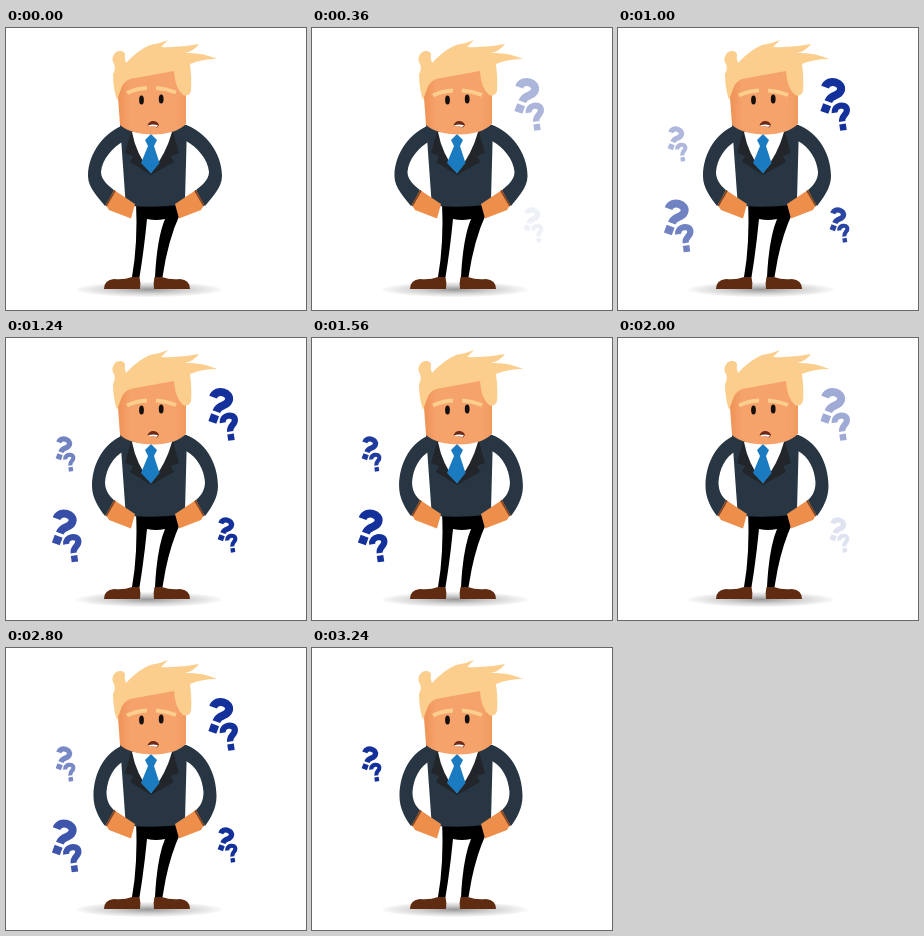
Recreate the animation shown at these times as an HTML page. Size 300 by 282 pixels, loop 3400 ms.

```html
<!DOCTYPE html>
<html lang="en">
<head>
<meta charset="utf-8">
<title>Puzzled businessman</title>
<style>
html, body { margin: 0; width: 100%; height: 100%; overflow: hidden; background: #fff; }
svg { display: block; width: 100vw; height: 100vh; }
</style>
</head>
<body>
<svg viewBox="0 0 300 282">
  <defs>
    <radialGradient id="shade">
      <stop offset="0" stop-color="#999"/>
      <stop offset=".5" stop-color="#d0d0d0"/>
      <stop offset="1" stop-color="#fafafa"/>
    </radialGradient>
    <linearGradient id="skin">
      <stop offset="0" stop-color="#ee8f52"/>
      <stop offset=".2" stop-color="#f5a26b"/>
      <stop offset=".85" stop-color="#f5a26b"/>
      <stop offset="1" stop-color="#f09a5e"/>
    </linearGradient>
    <g id="mark">
      <path d="M-8 -6C-8 -16 8 -16.5 8 -8C8 -1 0 -2 0 6.5" fill="none" stroke="#14309a" stroke-width="8"/>
      <rect x="-4.2" y="9.8" width="8.4" height="8.2" fill="#14309a"/>
    </g>
    <g id="pair">
      <use href="#mark" transform="rotate(20)"/>
      <use href="#mark" transform="translate(11 21) rotate(-8) scale(.78)"/>
    </g>
    <g id="limb">
      <path class="sleeve" fill="#283643"/>
      <path d="M108 162L129 176L125 190.5L103 182L100 177Z" fill="#ee8e4b"/>
      <path d="M109 162.5L100 178" stroke="#7d4526" stroke-width="1.6"/>
    </g>
  </defs>

  <ellipse cx="143" cy="261.5" rx="73" ry="7.5" fill="url(#shade)"/>
  <g fill="#602c11">
    <path id="shoe" d="M126 249H133.500Q135 255 134 261H98Q98 252 108 251Q118 252 126 249Z"/>
    <use href="#shoe" transform="translate(282) scale(-1 1)"/>
  </g>
  <path d="M130 174H174V186Q162 212 156.500 249H149Q151 210 159 191Q150 193 141 191Q138 222 133.500 249H126Q132 215 130 174Z" fill="#000"/>

  <path d="M114 96L181 97L179 172Q179 176 174 177Q148 180 125 178Q120 178 119.500 173Z" fill="#283643"/>
  <use href="#limb"/>
  <use href="#limb" transform="translate(298) scale(-1 1)"/>

  <path d="M125 104L119 125L127 128L124 134L145 147L168 134L165 128L173 125L167 104Z" fill="#22262b"/>
  <path d="M126 104H166Q160 126 145 145Q130 126 126 104Z" fill="#fff"/>
  <path d="M139 112L145 106L151 112L148 118L153.500 135L145 145.500L135 135L142 118Z" fill="#1b7bc1"/>

  <path d="M110 42H180V96Q170 106 147 106.500Q124 106 114 97Z" fill="url(#skin)"/>
  <path d="M111 72Q107 60 107 46Q110 41 108 36Q104 30 110 24Q117 21 119 26Q118 30 120 35Q132 22 144 17Q153 16 162 12L155 19Q174 20 193 16Q188 23 179 25Q196 24 211 31Q196 31 184 36Q186 50 185 63Q183 69 177 67Q169 60 168 43L124 51Q117 54 115 61Z" fill="#fbce8d"/>
  <g id="brows" fill="none" stroke="#fbce8d" stroke-width="4">
    <path d="M121 67.500Q130 63 141 62.500"/>
    <path d="M150 62.500Q160 63 170 67"/>
  </g>
  <g fill="#151010">
    <ellipse cx="135.500" cy="72" rx="2.400" ry="4.500"/>
    <ellipse cx="155.200" cy="71" rx="2.400" ry="4.500"/>
  </g>
  <path d="M141.500 97.500Q143 93 147 93Q151.500 93 153 97L151 99.500Q147 98 141.500 97.500Z" fill="#6b2a18"/>
  <path d="M142.500 97.200Q147 95.800 152 97.200L150.500 99Q147 98 142.500 98Z" fill="#fff"/>

  <g id="marks"></g>
</svg>
<script>
const LOOP = 3400, STEP = 40, CYCLE = 1590, STAY = 1195;
const SVG = 'http://www.w3.org/2000/svg';
const sleeve = document.querySelector('.sleeve');
const brows = document.getElementById('brows');
const clamp = v => Math.min(1, Math.max(0, v));
const ease = v => (1 - Math.cos(Math.PI * clamp(v))) / 2;

// x, y, scale, delay, fade time
const pairs = [
  [212.5, 67.5, 1, 50, 890],
  [218.4, 191, .67, 310, 770],
  [56, 189, 1, 430, 950],
  [56.4, 110, .67, 690, 920]
].map(([x, y, scale, delay, fade]) => {
  const node = document.createElementNS(SVG, 'use');
  node.setAttribute('href', '#pair');
  node.setAttribute('transform', `translate(${x} ${y}) scale(${scale})`);
  document.getElementById('marks').append(node);
  return { node, delay, fade };
});

function opacity(t, { delay, fade }) {
  let age = t - delay;
  if (age >= CYCLE) age -= CYCLE;
  return age < 0 || age >= STAY ? 0 : clamp(age / fade);
}

function draw(time) {
  let t = Math.floor(time % LOOP / STEP) * STEP;
  if (t < 80) t = 0;
  for (const p of pairs) p.node.setAttribute('opacity', opacity(t, p));

  // Elbows draw in while the brows sink
  const out = 82 + 5.5 * ease(t / 1900), inn = out + 13;
  sleeve.setAttribute('d',
    `M118 97C100 103 ${out} 124 ${out} 148C${out} 160 93 170 99 178L109 163` +
    `C103 158 ${inn} 152 ${inn} 144C${inn + 1} 131 107 119 118 113Z`);
  brows.setAttribute('transform', `translate(0 ${-2.5 * (1 - ease(t / 340))})`);
}

const start = performance.now();
function tick() {
  draw(performance.now() - start);
  requestAnimationFrame(tick);
}
tick();
</script>
</body>
</html>
```
